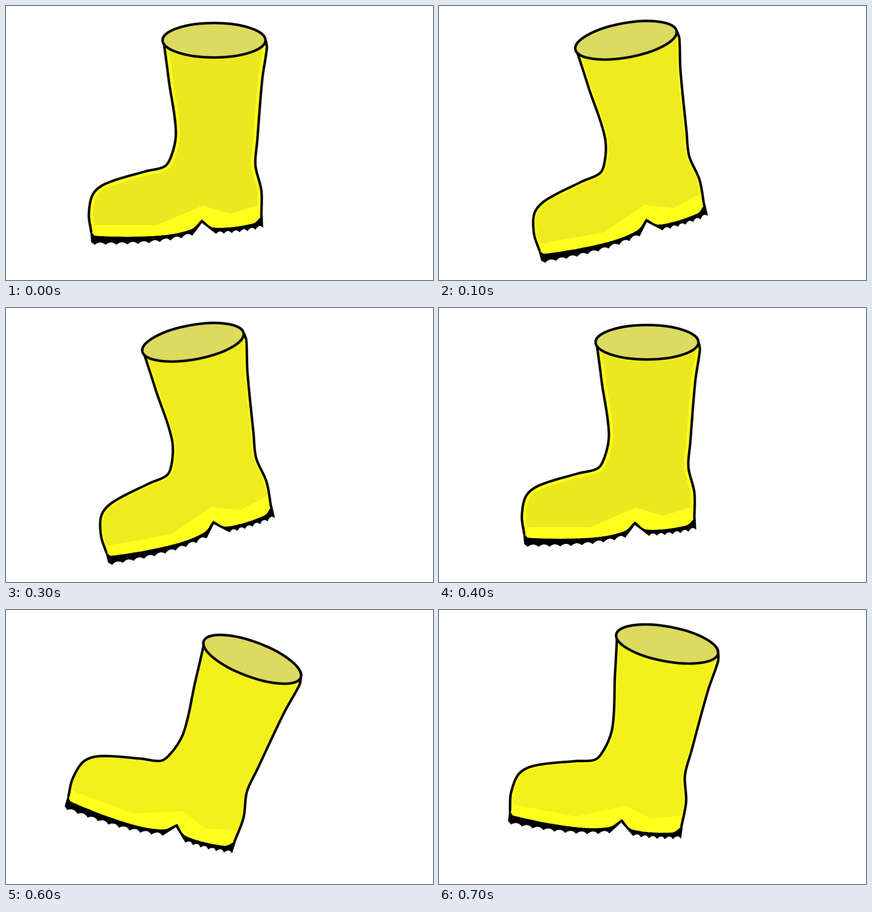
Recreate the animation shown at these times as an HTML page. Size 933 by 600 pixels, loop 800 ms.

```html
<!DOCTYPE html>
<html lang="en">
<head>
<meta charset="utf-8">
<title>Swinging boot</title>
<style>
  html, body { margin: 0; width: 100%; height: 100%; overflow: hidden; background: #fff; }
  svg { display: block; width: 100vw; height: 100vh; }
  .line { fill: none; stroke: #000; stroke-width: 5.4; stroke-linejoin: round; stroke-linecap: round; }
</style>
</head>
<body>
<svg viewBox="0 0 933 600">
  <clipPath id="inside"><path class="shape"/></clipPath>
  <g id="boot">
    <g transform="translate(-454.5 -75)">
      <path id="sole"/>
      <path id="body" class="shape"/>
      <g clip-path="url(#inside)" fill="none" stroke="#ffff1e">
        <path id="rim" class="shape"/>
        <path d="M180 480 H330 L430 437 L490 455 L570 430 V520 H180 Z" fill="#ffff1e" stroke="none"/>
      </g>
      <path id="edge" class="line"/>
      <ellipse class="line" cx="454.5" cy="75" rx="112.5" ry="37.7" style="fill:#dcda5f"/>
    </g>
  </g>
</svg>
<script>
const $ = id => document.getElementById(id);

// Key points of the four sides, clockwise from the top right
const shin = [[568, 77], [570, 92], [560, 160], [549, 295], [545, 349], [558, 404], [558, 460]];
const heel = [[558, 460], [540, 476], [454, 485], [428, 467]];
const ball = [[428, 467], [404, 489], [330, 503], [196, 503], [186, 494]];
const instep = [
  [186, 494], [181, 456], [190, 412], [220, 388], [305, 362], [347, 351],
  [362, 326], [371, 285], [368, 240], [357, 172], [351, 126], [345, 82]
];

const dist = (a, b) => Math.hypot(b[0] - a[0], b[1] - a[1]);

// Curve through all points, with handles as long as a third of each span
function smooth(pts) {
  const slope = (i, k) => {
    const a = pts[i - 1] || pts[i], b = pts[i], c = pts[i + 1] || b;
    return (c[k] - a[k]) / (dist(a, b) + dist(b, c));
  };
  return pts.slice(1).map((c, i) => {
    const b = pts[i], reach = dist(b, c) / 3;
    const out = b.map((v, k) => v + slope(i, k) * reach);
    const back = c.map((v, k) => v - slope(i + 1, k) * reach);
    return `C${out} ${back} ${c}`;
  }).join(' ');
}

// Row of arches whose tips follow a falling power curve
function tread(x0, x1, count, y, lift, power) {
  const step = (x1 - x0) / count;
  let d = `L${x0} ${y}`;
  for (let i = 1; i <= count; i++) {
    const x = x0 + step * i, tip = y - lift * (i / count) ** power;
    d += ` Q${x - step / 2} ${tip - 10} ${x} ${tip}`;
  }
  return d;
}

const start = `M${shin[0]}`;
const outline = start + [shin, heel, ball, instep].map(smooth).join(' ') + ' Z';
document.querySelectorAll('.shape').forEach(p => p.setAttribute('d', outline));
$('edge').setAttribute('d', `${start}${smooth(shin)} M${instep[0]}${smooth(instep)}`);
$('sole').setAttribute('d',
  `M184 492 L186 517 ${tread(194, 407, 9, 523, 20, 3)} L428 475 L446 489` +
  ` ${tread(459, 562, 6, 499, 13, 2)} L561 459 L454 478 L428 463 L404 484 L330 498 Z`);

const still = { x: 454.5, y: 75, turn: 0, size: 1, fill: '#ebe81f' };
const left = { x: 408.5, y: 75, turn: -10.3, size: 1, fill: '#eeeb1f' };
const farLeft = { x: 322.5, y: 90, turn: -23.6, size: 1.01, fill: '#f4f21c' };
const right = { x: 498.5, y: 74.5, turn: 10.6, size: 1.007, fill: '#f3f11c' };
const farRight = { x: 538, y: 108, turn: 20.6, size: 1.007, fill: '#f3f11c' };
const poses = [still, left, farLeft, left, still, right, farRight, right];

function play(el, style) {
  const keys = [...poses, right].map((p, i) => (
    { ...style(p), offset: i / poses.length, easing: 'step-end' }));
  el.animate(keys, { duration: 800, iterations: Infinity }).startTime = 0;
}

play($('boot'), p => ({
  transform: `translate(${p.x}px, ${p.y}px) rotate(${p.turn}deg) scale(${p.size})`
}));
play($('body'), p => ({ fill: p.fill }));
play($('rim'), p => ({ strokeWidth: `${18 - Math.abs(p.turn) / 2}px` }));
</script>
</body>
</html>
```
